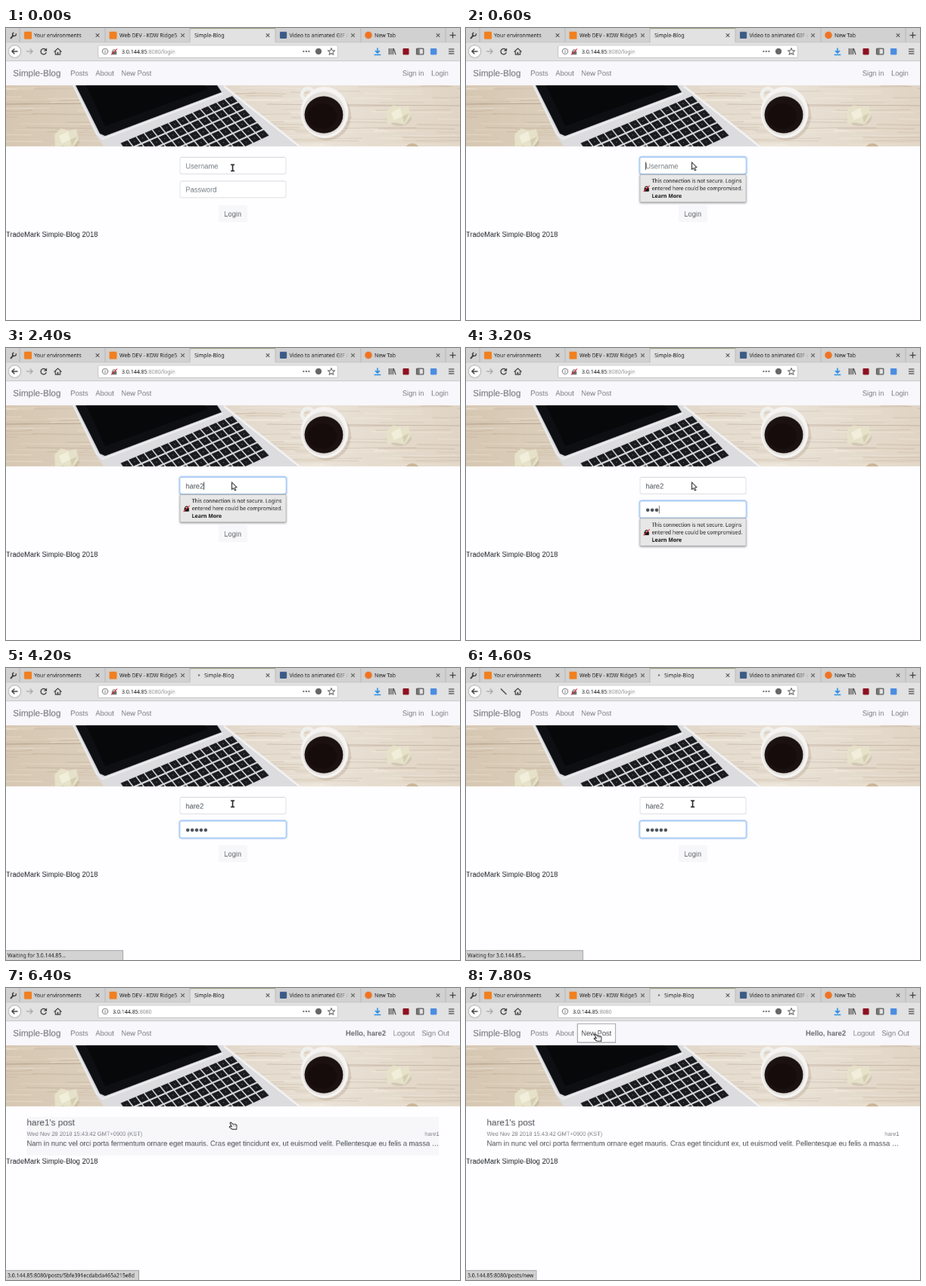
An HTML page with a canvas that plays this animation: 600 px wide and 387 px high, repeating every 8000 ms.

```html
<!DOCTYPE html>
<html lang="en">
<head>
<meta charset="utf-8">
<title>Simple-Blog login</title>
<style>
html, body { margin: 0; width: 100%; height: 100%; overflow: hidden; background: #fefdff; }
canvas { display: block; width: 600px; height: 387px; }
</style>
</head>
<body>
<canvas id="stage"></canvas>
<script>
const W = 600, H = 387, LOOP = 8000, TICK = 200;
// The desktop is 1024 pixels wide and shown scaled down
const K = 1024 / W;
const dpr = window.devicePixelRatio || 1;
const UI = '"Noto Sans", sans-serif', PAGE = '"Liberation Sans", Arial, sans-serif';
const BODY = 16 / K, HEAD = 20 / K, SMALL = 12.8 / K, CHROME = 12 / K;
const USER = 'hare2', AUTHOR = 'hare1';

function makeLayer(canvas, scale) {
  canvas.width = Math.round(W * scale);
  canvas.height = Math.round(H * scale);
  const g = canvas.getContext('2d');
  g.scale(canvas.width / W, canvas.height / H);
  g.imageSmoothingQuality = 'high';
  return g;
}
const out = makeLayer(document.getElementById('stage'), dpr);
const desktop = makeLayer(document.createElement('canvas'), K);
const banner = makeLayer(document.createElement('canvas'), K);
let c = desktop;

function rect(x, y, w, h, fill) {
  c.fillStyle = fill;
  c.fillRect(x, y, w, h);
}
function paint(fill, stroke, lw) {
  if (fill) { c.fillStyle = fill; c.fill(); }
  if (stroke) { c.strokeStyle = stroke; c.lineWidth = lw; c.stroke(); }
}
function box(x, y, w, h, r, fill, stroke, lw = 0.7) {
  c.beginPath();
  c.roundRect(x, y, w, h, r);
  paint(fill, stroke, lw);
}
function oval(x, y, rx, ry, fill, stroke, lw = 1) {
  c.beginPath();
  c.ellipse(x, y, rx, ry, 0, 0, Math.PI * 2);
  paint(fill, stroke, lw);
}
function arc(x, y, r, from, to, color, lw) {
  c.beginPath();
  c.arc(x, y, r, from, to);
  paint(null, color, lw);
}
function trace(p) {
  c.beginPath();
  for (let i = 0; i < p.length; i += 2) c.lineTo(p[i], p[i + 1]);
}
function line(p, color, lw = 1) {
  trace(p);
  paint(null, color, lw);
}
function poly(p, fill, stroke, lw = 0.8) {
  trace(p);
  c.closePath();
  paint(fill, stroke, lw);
}
function text(s, x, y, size, color, family = PAGE, weight = 'normal', align = 'left') {
  c.font = `${weight} ${size}px ${family}`;
  c.textAlign = align;
  c.fillStyle = color;
  c.fillText(s, x, y);
  return c.measureText(s).width;
}
function cross(x, y, r, color, lw) {
  line([x - r, y - r, x + r, y + r], color, lw);
  line([x + r, y - r, x - r, y + r], color, lw);
}

// Banner photo reduced to flat shapes
function paintWood() {
  let seed = 7;
  const rnd = () => (seed = (seed * 16807) % 2147483647) / 2147483647;
  const wood = c.createLinearGradient(0, 0, W, 0);
  wood.addColorStop(0, '#d6c7b2');
  wood.addColorStop(0.5, '#e3d9cb');
  wood.addColorStop(0.72, '#e9e1d5');
  wood.addColorStop(1, '#e0d4c4');
  rect(0, 76, W, 81, wood);
  for (let i = 0; i < 130; i++) {
    const x = rnd() * 660 - 60, y = 77 + rnd() * 80, len = 30 + rnd() * 90;
    const tone = rnd() < 0.55 ? 'rgba(150,122,92,.17)' : 'rgba(255,250,240,.25)';
    line([x, y, x + len / 2, y + rnd() * 2 - 1, x + len, y + rnd() * 2 - 1], tone, 0.6 + rnd());
  }
  line([0, 101, 100, 100], 'rgba(120,98,76,.4)');
  line([345, 101, W, 103], 'rgba(120,98,76,.3)');
}

function paintLaptop() {
  poly([88, 76, 287, 76, 388, 158, 130, 158, 119, 142], '#dcdcdf');
  poly([92, 76, 279, 76, 285, 85, 131, 143, 124, 140], '#0e0f13');
  poly([106, 76, 262, 76, 267, 81, 131, 130], '#07080a');
  line([89, 76, 120, 140, 128, 147, 286, 87], '#eeeef0', 2);
  line([288, 77, 388, 157], '#f3f3f4', 2.5);

  const keyPoint = (u, v) => {
    const lx = 150 + 46 * v, ly = 152 + 62 * v;
    return [lx + (299 + 50 * v - lx) * u, ly + (89 + 54 * v - ly) * u];
  };
  const rows = 6, cols = 14;
  for (let r = 0; r < rows; r++) {
    for (let k = 0; k < cols; k++) {
      const u = (k + 0.07) / cols, v = (r + 0.09) / rows;
      const u2 = u + 0.86 / cols, v2 = v + 0.82 / rows;
      poly([...keyPoint(u, v), ...keyPoint(u2, v), ...keyPoint(u2, v2), ...keyPoint(u, v2)], '#191a1e');
      const [x, y] = keyPoint((k + 0.5) / cols, (r + 0.5) / rows);
      rect(x - 0.6, y - 0.5, 1.2, 1, '#77787d');
    }
  }
}

function paintPaper(x, y) {
  oval(x + 2, y + 4, 16, 11, 'rgba(120,98,76,.16)');
  poly([x - 15, y - 5, x - 6, y - 13, x + 4, y - 10, x + 14, y - 12, x + 17, y + 2,
    x + 9, y + 13, x - 4, y + 10, x - 14, y + 13], '#e6e1c9');
  poly([x - 9, y - 3, x + 3, y - 9, x + 6, y + 2, x - 5, y + 7], '#f1eedb');
  poly([x + 6, y + 2, x + 15, y - 2, x + 8, y + 11], '#d3cdb2');
}

function paintBanner() {
  c.save();
  c.beginPath();
  c.rect(0, 76, W, 81);
  c.clip();
  paintWood();
  paintLaptop();
  oval(424, 116, 32, 33, 'rgba(120,98,76,.18)');
  oval(399, 88, 8, 8, null, '#f0f0ee', 4.5);
  oval(421, 112, 31.5, 34, '#f5f4f2');
  oval(420, 113.5, 28, 29, '#e3e0dc');
  oval(420, 115, 25.5, 24.5, '#1b1110');
  oval(418, 117, 19, 17, '#150c0b');
  paintPaper(79, 146);
  paintPaper(518, 115);
  oval(537, 158, 8, 5, '#cbb496');
  c.restore();
}

c = banner;
paintBanner();
c = desktop;

function drawTabs(t, loading) {
  const bg = '#d1d1d1', ink = '#1c1c1c';
  const title = (s, x) => text(s, x, 12.5, CHROME, ink, UI);
  rect(0, 0, W, 19, bg);
  line([6, 14, 10, 9.5], '#333', 1.8);
  arc(11, 8.3, 2.3, -0.4, 4.4, '#333', 1.4);
  rect(243, 0, 113, 20, '#e2e2e2');
  rect(243, 0, 113, 1.2, '#98a27e');
  for (const x of [18, 131, 243, 356, 469, 581]) rect(x - 0.4, 0, 0.8, 19, '#aaaaaa');
  box(24, 4.7, 10, 10, 1.5, '#f08020');
  title('Your environments', 37);
  box(136.5, 4.7, 10, 10, 1.5, '#f08020');
  title('Web DEV - KDW Ridge5', 150);
  if (loading) oval(255 - 5 * Math.sin(t / 800 * Math.PI * 2 - Math.PI / 2), 9.5, 1.2, 1.2, '#666');
  title('Simple-Blog', loading ? 262 : 249);
  box(362, 5, 9, 9, 1, '#3c5a86');
  title('Video to animated GIF c', 374.5);
  const fade = c.createLinearGradient(438, 0, 453, 0);
  fade.addColorStop(0, bg + '00');
  fade.addColorStop(1, bg);
  rect(438, 3, 16, 14, fade);
  oval(479, 9.5, 4.8, 4.8, '#ee7424');
  title('New Tab', 487);
  for (const x of [121, 233.5, 346, 458.5, 571]) cross(x, 9.7, 2.3, '#444', 0.9);
  line([586.5, 9.5, 594.5, 9.5], '#333', 1.2);
  line([590.5, 5.5, 590.5, 13.5], '#333', 1.2);
}

function drawToolbar(t, home) {
  const ink = '#3b3b3b';
  rect(0, 19, W, 25, '#e2e2e2');
  rect(0, 18.6, 243, 0.6, '#b4b4b4');
  rect(356, 18.6, 244, 0.6, '#b4b4b4');
  rect(0, 43.3, W, 0.8, '#bcbcbc');

  oval(11.5, 31, 8.2, 8.2, '#fbfbfb', '#a5a5a5', 0.8);
  line([15.5, 31, 8, 31], ink, 1.3);
  line([11.3, 27.6, 7.8, 31, 11.3, 34.4], ink, 1.3);
  line([27, 31, 35, 31], '#a4a4a4', 1.2);
  line([31.7, 27.6, 35, 31, 31.7, 34.4], '#a4a4a4', 1.2);

  if (t >= 4400 && t < 5000) {
    line([46, 27.5, 53.5, 35], ink, 1.3);
    if (t >= 4800) line([53.5, 27.5, 46, 35], ink, 1.3);
  } else {
    arc(49.7, 31.2, 3.7, 0.3, 5.4, ink, 1.3);
    poly([54, 26.5, 54, 30.7, 49.8, 30.7], ink);
  }
  line([63.6, 31.6, 68.5, 27, 73.4, 31.6], ink, 1.2);
  line([65.4, 30.5, 65.4, 35, 71.6, 35, 71.6, 30.5], ink, 1.2);
  rect(67.7, 32, 1.6, 3, ink);

  box(121.8, 23, 316.4, 16.4, 2, '#ffffff', '#b9b9b9');
  oval(131, 31, 3.7, 3.7, null, '#777', 0.9);
  rect(130.5, 30.4, 1, 2.8, '#666');
  rect(130.5, 28.7, 1, 1, '#666');
  if (!home) drawLock(143, 31.5, 1, '#6d6d6d');
  const x = home ? 141 : 153;
  const host = text('3.0.144.85', x, 33.8, CHROME, '#151515', UI);
  text(home ? ':8080' : ':8080/login', x + host, 33.8, CHROME, '#8b8b8b', UI);
  for (const d of [393.3, 396.8, 400.3]) oval(d, 31, 1.1, 1.1, '#555');
  oval(413, 31, 4.2, 4.2, '#666');
  const star = [];
  for (let i = 0; i < 10; i++) {
    const a = i * Math.PI / 5 - Math.PI / 2, r = i % 2 ? 2.1 : 4.7;
    star.push(430 + r * Math.cos(a), 31.4 + r * Math.sin(a));
  }
  poly(star, null, '#555', 0.9);

  const blue = '#1583e8';
  line([491, 26.5, 491, 33], blue, 1.4);
  line([488, 30, 491, 33, 494, 30], blue, 1.4);
  line([486.7, 35.5, 495.3, 35.5], blue, 1.3);
  for (const d of [506.3, 508.8, 511.3]) line([d, 27, d, 35.3], ink, 1.2);
  line([512.4, 27.3, 514.9, 35.3], ink, 1.2);
  box(524.5, 27, 8, 8.5, 1, '#8e1020');
  box(542.5, 27.2, 9.3, 7.8, 1, null, ink, 1);
  rect(543, 28, 3.6, 6.4, '#777');
  box(560.8, 27, 8.5, 8.5, 1, '#4b8de0');
  for (const y of [28, 31, 34]) line([584.8, y, 592.3, y], ink, 1.1);
}

function drawLock(x, y, k, color) {
  box(x - 3.2 * k, y - 0.6 * k, 6.4 * k, 4.4 * k, 0.6, color);
  arc(x, y - 0.6 * k, 2.1 * k, Math.PI, 0, color, 1.1 * k);
  line([x - 4 * k, y + 4 * k, x + 4 * k, y - 4 * k], '#e02030', 1.1 * k);
}

function drawNav(t, home) {
  const link = '#7d7d80', strong = '#6b6b6e';
  const item = (s, x, color = link, weight) => text(s, x, 63.3, BODY, color, PAGE, weight);
  rect(0, 44, W, 32.3, '#f8f7fb');
  text('Simple-Blog', 9.3, 64, HEAD, strong);
  item('Posts', 85.3);
  item('About', 118.3);
  if (t >= 7400) box(147.3, 47.6, 50.4, 24.5, 0, '#fdfcff', '#8b8b8e', 0.8);
  item('New Post', 152.3, t >= 7200 ? '#47474a' : link);
  if (home) {
    item('Hello, ' + USER, 449, strong, 'bold');
    item('Logout', 511.7);
    item('Sign Out', 549.4);
  } else {
    item('Sign in', 523.8);
    item('Login', 562);
  }
}

function drawField(y, focus) {
  if (focus) box(229, y - 0.9, 142, 23.8, 3.2, null, 'rgba(50,130,225,.32)', 2);
  box(230, y, 140, 22, 2.4, '#ffffff', focus ? '#8abcf0' : '#c9ccd4');
}

function drawWarning(y) {
  c.save();
  c.shadowColor = 'rgba(0,0,0,.5)';
  c.shadowBlur = 3 * K;
  c.shadowOffsetY = K;
  box(230, y, 140, 36.5, 0.5, '#e7e7e7');
  c.restore();
  box(230, y, 140, 36.5, 0.5, null, '#a9a9a9');
  drawLock(238.7, y + 18.5, 1, '#111');
  text('This connection is not secure. Logins', 245.7, y + 11, 6.9, '#1a1a1a', UI);
  text('entered here could be compromised.', 245.7, y + 21, 6.9, '#1a1a1a', UI);
  text('Learn More', 245.7, y + 31, 6.9, '#111', UI, 'bold');
}

function drawLogin(t) {
  const focus = t < 400 ? 0 : t < 2600 ? 1 : 2;
  const name = USER.slice(0, t < 1400 ? 0 : Math.floor((t - 1400) / 200) + 1);
  const dots = Math.max(0, Math.min(5, Math.floor((t - 2600) / 200)));
  const lastKey = t < 1400 ? 400 : t < 2600 ? Math.min(t, 2200) : Math.min(t, 3600);
  const blink = (t - lastKey) % 1000 < 500;

  drawField(171.3, focus === 1);
  const w = text(name || 'Username', 237.3, 186.2, BODY, name ? '#495057' : '#737a82');
  if (focus === 1 && blink) rect(237.3 + (name ? w : 0), 177.5, 0.7, 10.5, '#222');

  drawField(203, focus === 2);
  if (!dots) text('Password', 237.3, 217.7, BODY, '#737a82');
  for (let i = 0; i < dots; i++) oval(240.2 + i * 5.9, 214.8, 2.2, 2.2, '#495057');
  if (focus === 2 && blink && t < 4000) rect(237.3 + dots * 5.9, 209, 0.7, 10.5, '#222');

  box(281, 235, 38, 22, 2.4, '#f7f7fa');
  text('Login', 288.2, 249.5, BODY, '#65686c');
  if (focus && t < 4000) drawWarning(focus === 1 ? 194.3 : 225.8);
  text('TradeMark Simple-Blog 2018', 0, 276.8, BODY, '#212529');
}

function drawPosts(hover) {
  if (hover) rect(27.5, 171, 544.5, 51, '#f7f7fa');
  text(AUTHOR + "'s post", 27.5, 182.3, HEAD, '#505459');
  text('Wed Nov 28 2018 15:43:42 GMT+0900 (KST)', 27.5, 196, SMALL, '#7b7e83');
  text(AUTHOR, 572.5, 196, SMALL, '#7b7e83', PAGE, 'normal', 'right');
  text('Nam in nunc vel orci porta fermentum ornare eget mauris. Cras eget tincidunt ex, ut euismod velit. Pellentesque eu felis a massa …',
    27.5, 209.2, BODY, '#45494e');
  text('TradeMark Simple-Blog 2018', 0, 233, BODY, '#212529');
}

function drawStatus(s, w) {
  box(-1, 374.3, w + 1, 14, 0, '#d3d3d3', '#999', 0.8);
  text(s, 2, 383.4, 6.94, '#161616', UI);
}

const cursors = {
  beam(x, y) {
    for (const [color, lw] of [['#ffffff', 2.8], ['#222222', 1.6]]) {
      line([x, y - 4, x, y + 4], color, lw);
      line([x - 2.4, y - 4.1, x + 2.4, y - 4.1], color, lw);
      line([x - 2.4, y + 4.1, x + 2.4, y + 4.1], color, lw);
    }
  },
  arrow(x, y) {
    poly([x, y, x, y + 9.5, x + 2.2, y + 7.6, x + 3.8, y + 11, x + 5.4, y + 10.2,
      x + 3.9, y + 7, x + 6.5, y + 6.7], '#ffffff', '#222', 0.9);
  },
  hand(x, y) {
    poly([x - 4, y - 3.6, x - 2.8, y - 4.5, x - 0.3, y - 2, x + 3.4, y - 1.8, x + 5, y - 0.5,
      x + 4.8, y + 4.8, x - 1, y + 4.8, x - 4.8, y + 1.8, x - 4, y + 0.6, x - 1.8, y + 1.2], '#ffffff', '#222', 1);
    line([x + 0.8, y - 1, x + 0.8, y + 1], '#333', 0.6);
    line([x + 2.8, y - 0.8, x + 2.8, y + 1], '#333', 0.6);
  }
};

function drawCursor(t) {
  if (t < 400) return cursors.beam(299.5, 185.3);
  if (t < 4200) return cursors.arrow(298.5, 178);
  if (t < 5400) return cursors.beam(299.5, 180);
  const p = Math.max(0, Math.min(1, (t - 6600) / 600));
  const e = p * p * (3 - 2 * p);
  const x = 300 - 126 * e, y = 182.5 - 117 * e;
  cursors[p > 0.2 && p < 1 ? 'arrow' : 'hand'](x, y);
}

function draw(t) {
  const home = t >= 5000;
  const waiting = t >= 4200 && t < 5000;
  rect(0, 0, W, H, '#fefdff');
  drawTabs(t, waiting || t >= 7600);
  drawToolbar(t, home);
  drawNav(t, home);
  c.drawImage(banner.canvas, 0, 0, W, H);
  if (home) drawPosts(t >= 5400 && t < 6800);
  else drawLogin(t);
  if (waiting) drawStatus('Waiting for 3.0.144.85...', 154.5);
  else if (t >= 7200) drawStatus('3.0.144.85:8080/posts/new', 93);
  else if (t >= 5400) drawStatus('3.0.144.85:8080/posts/5bfe391ecdabda465a215e8d', 175.5);
  drawCursor(t);
  out.drawImage(desktop.canvas, 0, 0, W, H);
}

function loop() {
  const t = performance.now() % LOOP;
  draw(Math.floor(t / TICK) * TICK);
  requestAnimationFrame(loop);
}
loop();
</script>
</body>
</html>
```
